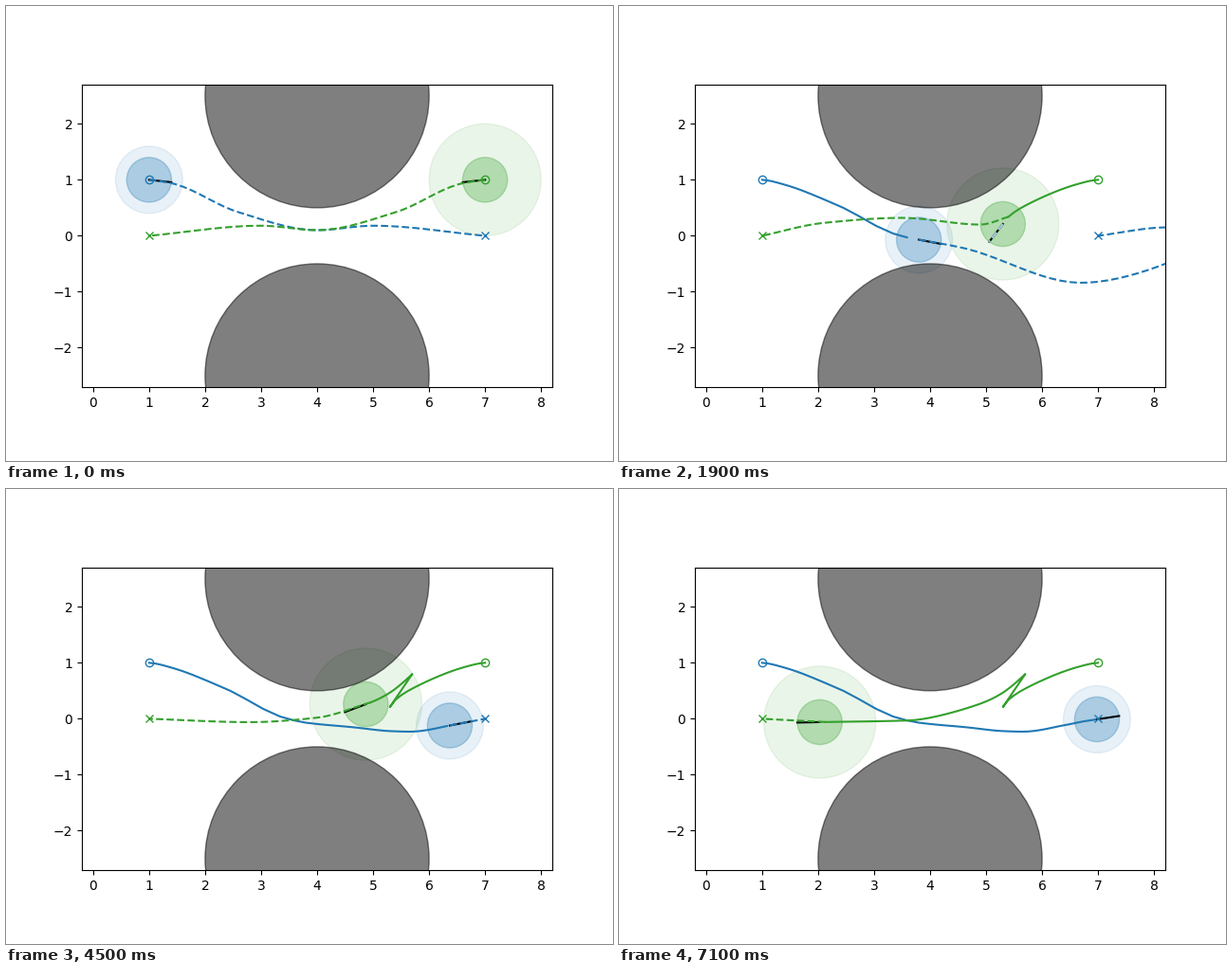
Recreate the animation shown at these times as a matplotlib script. Size 640 by 480 pixels, loop 7200 ms.

```python
import numpy as np
import matplotlib.pyplot as plt
from matplotlib.animation import FuncAnimation
from matplotlib.patches import Circle

FRAMES, STEP_MS = 72, 100
ROBOT_RADIUS = 0.4
U = np.linspace(0, 1, 40)


def smooth(t, knots, values, from_rest=False):
    """Monotone cubic interpolation of each column of values."""
    h = np.diff(knots)[:, None]
    d = np.diff(values, axis=0) / h
    prod, total = d[:-1] * d[1:], d[:-1] + d[1:]
    inner = np.where(prod > 0, 2 * prod / np.where(prod > 0, total, 1), 0)
    first = np.zeros_like(d[:1]) if from_rest else d[:1]
    m = np.vstack([first, inner, d[-1:]])
    i = np.clip(np.searchsorted(knots, t, side="right") - 1, 0, len(h) - 1)
    s = ((t - knots[i]) / h[i, 0])[:, None]
    ease = s * s * (3 - 2 * s)
    return (values[i] + ease * h[i] * d[i]
            + s * (1 - s) * h[i] * ((1 - s) * m[i] - s * m[i + 1]))


def curve(points):
    points = np.array(points, float)
    chords = np.hypot(*np.diff(points, axis=0).T)
    knots = np.concatenate([[0], np.cumsum(chords)])
    return smooth(U, knots / knots[-1], points)


def mirrored(points):
    return [(8 - x, y) for x, y in points]


class Agent:
    """Robot with a trail, a heading, a plan and a short-lived forecast."""

    def __init__(self, ax, poses, plans, goal, margin, color, light,
                 facing, plan_lag, forecast_on, horizon):
        times, points = zip(*poses)
        self.pos = smooth(np.arange(FRAMES) / 10, np.array(times),
                          np.array(points, float), from_rest=True)
        # The robot keeps facing its goal side even while it backs up.
        steps = np.diff(self.pos, axis=0)
        steps = np.vstack([steps[:1], steps])
        self.speed = np.hypot(*steps.T)
        self.dir = steps / self.speed[:, None]
        self.dir *= facing * np.sign(steps[:, :1])

        self.plan_lag = plan_lag
        self.plan_times = [t for t, _ in plans]
        self.plans = [curve([self.plan_start(round(t * 10)), *via, goal])
                      for t, via in plans]
        self.forecast_on, self.horizon = forecast_on, horizon

        start = self.pos[0]
        self.discs = [Circle(start, margin, color=color, alpha=0.1),
                      Circle(start, ROBOT_RADIUS, color=color, alpha=0.3)]
        for disc in self.discs:
            ax.add_patch(disc)
        ax.plot(*start, "o", color=color, mfc="none", zorder=3)
        ax.plot(*goal, "x", color=color, zorder=3)
        self.trail, = ax.plot([], [], color=color, zorder=2.1)
        self.nose, = ax.plot([], [], color="black", zorder=2.2)
        self.forecast, = ax.plot([], [], "--", color=light, zorder=2.3)
        self.plan, = ax.plot([], [], "--", color=color, zorder=2.4)

    def plan_start(self, f):
        return self.pos[max(f - self.plan_lag, 0)]

    def plan_at(self, f):
        """Blend neighbouring plans and pull the result to the robot."""
        key = np.interp(f / 10, self.plan_times, range(len(self.plans)))
        i = min(int(key), len(self.plans) - 2)
        path = self.plans[i] + (key - i) * (self.plans[i + 1] - self.plans[i])
        return path + (self.plan_start(f) - path[0]) * (1 - U[:, None])

    def ray(self, f, length):
        return np.array([self.pos[f], self.pos[f] + length * self.dir[f]]).T

    def update(self, f):
        for disc in self.discs:
            disc.center = self.pos[f]
        self.trail.set_data(*self.pos[:f].T)
        self.nose.set_data(*self.ray(f, ROBOT_RADIUS))
        self.plan.set_data(*self.plan_at(f).T)
        self.forecast.set_data(*self.ray(f, self.horizon * self.speed[f]))
        self.forecast.set_visible(f in self.forecast_on)


# Both robots pull away alike, seen in a mirror.
LAUNCH_TIMES = (0, 0.4, 0.8)
LAUNCH = [(1, 1), (1.12, 0.985), (1.48, 0.89)]
FIRST_VIA = [(1.4, 0.94), (2.6, 0.42), (4, 0.1), (5, 0.18)]
NEXT_VIA = [(2, 0.7), (2.6, 0.42), (4, 0.06), (5, -0.02)]

BLUE_POSES = [
    *zip(LAUNCH_TIMES, LAUNCH),
    (1.4, (2.45, 0.5)), (1.7, (3.34, 0.04)), (1.9, (3.8, -0.07)),
    (2.4, (4.63, -0.15)), (3, (5.3, -0.22)), (3.4, (5.65, -0.23)),
    (4.5, (6.37, -0.12)), (5.5, (6.75, -0.045)), (7.1, (6.98, -0.01)),
]
GREEN_POSES = [
    *zip(LAUNCH_TIMES, mirrored(LAUNCH)),
    (1.5, (5.72, 0.55)), (1.8, (5.4, 0.34)), (1.9, (5.3, 0.21)),
    (2.8, (5.7, 0.8)), (3.8, (5.32, 0.48)), (4.5, (4.87, 0.26)),
    (5.5, (3.62, -0.03)), (7.1, (2.03, -0.06)),
]

# Time and the points a plan passes on its way to the goal
BLUE_PLANS = [
    (0, FIRST_VIA),
    (0.8, NEXT_VIA),
    (1.9, [(4.6, -0.22), (6.7, -0.84), (8.2, -0.5), (8.6, -0.15),
           (8.2, 0.15)]),
    (2.4, [(5.6, -0.27)]),
    (3, [(5.7, -0.22), (6.4, -0.1)]),
    (4.5, []),
]
GREEN_PLANS = [
    (0, mirrored(FIRST_VIA)),
    (0.8, mirrored(NEXT_VIA)),
    (1.9, [(4.9, 0.2), (3.5, 0.32), (2.1, 0.23)]),
    (3, [(4.8, 0.25), (4, 0.1), (3.2, 0.13)]),
    (4.5, [(4, 0.02), (2.8, -0.06)]),
    (5.5, [(2.7, -0.07)]),
    (7.1, []),
]

fig, ax = plt.subplots(figsize=(6.4, 4.8), dpi=100)
ax.set_aspect("equal")
ax.set_xlim(-0.2, 8.2)
ax.set_ylim(-2.7, 2.7)
for y in (2.5, -2.5):
    ax.add_patch(Circle((4, y), 2, color="black", alpha=0.5, zorder=1.5))

agents = [
    Agent(ax, BLUE_POSES, BLUE_PLANS, goal=(7, 0), margin=0.6,
          color="#1f78b4", light="#b2df8a", facing=1, plan_lag=0,
          forecast_on=range(24, 34), horizon=23),
    Agent(ax, GREEN_POSES, GREEN_PLANS, goal=(1, 0), margin=1.0,
          color="#33a02c", light="#a6cee3", facing=-1, plan_lag=1,
          forecast_on=range(18, 20), horizon=2.5),
]


def update(f):
    for agent in agents:
        agent.update(f)
    return []


anim = FuncAnimation(fig, update, frames=FRAMES, interval=STEP_MS,
                     repeat=True, repeat_delay=0)
plt.show()
```
